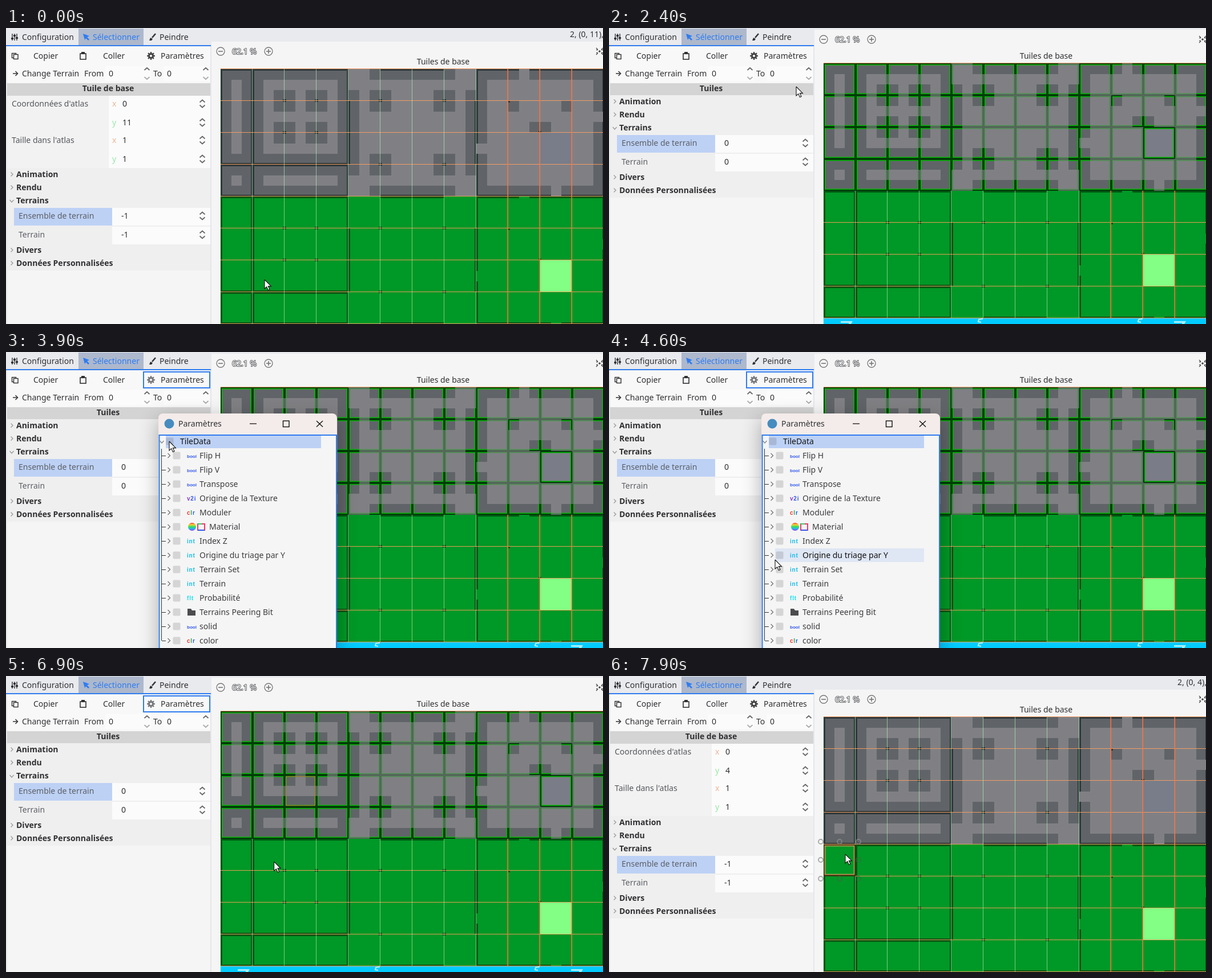
Recreate the animation shown at these times as an HTML page with a canvas. Size 1046 px wide and 520 px high, loop 8000 ms.

```html
<!DOCTYPE html>
<html lang="fr">
<head>
<meta charset="utf-8">
<style>
html, body { margin: 0; width: 100%; height: 100%; overflow: hidden; background: #f5f5f5; }
canvas { display: block; }
</style>
</head>
<body>
<canvas id="stage" width="1046" height="520"></canvas>
<script>
const ctx = document.getElementById('stage').getContext('2d');
const LOOP = 8000, STEP = 100, LEFT = 376, CELL = 56, UNIT = CELL / 3;
const INK = '#303033', BLUE = '#2f7cf0', PALE = '#bdd1f5', GREEN = '#009826';
const ORANGE = 'rgba(255,158,96,.9)', RED_ORANGE = '#ff7440';

// time, x, y of the pointer tip
const PATH = [
  [0, 453, 442], [900, 400, 92], [1600, 1012, 262], [2400, 328, 103], [2700, 300, 52],
  [2900, 300, 52], [3100, 321, 73], [3600, 286, 157], [3900, 286, 157], [4400, 290, 358],
  [4600, 291, 365], [4900, 299, 382], [5100, 299, 382], [5400, 299, 407], [5900, 297, 445],
  [6400, 548, 124], [6600, 548, 124], [7150, 410, 480], [7300, 430, 445], [7650, 414, 313], [8000, 414, 313]
];
const TIMES = { grouped: 1600, params: 2700, open: 2900, cleared: 3800, set: 4900, terrain: 5400, close: 6500, single: 7700 };

function pointer(t) {
  const i = Math.max(1, PATH.findIndex(p => p[0] > t));
  const [t0, x0, y0] = PATH[i - 1], [t1, x1, y1] = PATH[i];
  const k = Math.min(1, Math.max(0, (t - t0) / (t1 - t0))), e = k * k * (3 - 2 * k);
  return [x0 + (x1 - x0) * e, y0 + (y1 - y0) * e];
}

function rect(x, y, w, h, color) { ctx.fillStyle = color; ctx.fillRect(x, y, w, h); }

function frame(x, y, w, h, color, width = 1) {
  ctx.strokeStyle = color; ctx.lineWidth = width; ctx.strokeRect(x, y, w, h);
}

function line(points, color = INK, width = 1.5) {
  ctx.beginPath();
  for (let i = 0; i < points.length; i += 2) ctx.lineTo(points[i], points[i + 1]);
  ctx.strokeStyle = color; ctx.lineWidth = width; ctx.stroke();
}

function poly(points, color) {
  ctx.beginPath();
  for (let i = 0; i < points.length; i += 2) ctx.lineTo(points[i], points[i + 1]);
  ctx.closePath(); ctx.fillStyle = color; ctx.fill();
}

function ring(x, y, r, color, width = 1.2) {
  ctx.beginPath(); ctx.arc(x, y, r, 0, 7);
  ctx.strokeStyle = color; ctx.lineWidth = width; ctx.stroke();
}

function disc(x, y, r, color) {
  ctx.beginPath(); ctx.arc(x, y, r, 0, 7); ctx.fillStyle = color; ctx.fill();
}

function setFont(weight = '', size = 14) { ctx.font = `${weight} ${size}px "Noto Sans", sans-serif`; }

// text placed by the vertical middle of its row
function text(s, x, y, color = INK, weight = '', align = 'left') {
  setFont(weight); ctx.textAlign = align; ctx.fillStyle = color;
  ctx.fillText(s, x, y + 5);
}

function spinner(x, y, gap = 2.5, low = '#666') {
  line([x - 4.5, y - gap, x, y - gap - 4, x + 4.5, y - gap], '#666', 1.7);
  line([x - 4.5, y + gap, x, y + gap + 4, x + 4.5, y + gap], low, 1.7);
}

function gear(x, y, color) {
  ring(x, y, 3.6, color, 3);
  for (let i = 0; i < 8; i++) {
    const c = Math.cos(i * Math.PI / 4), s = Math.sin(i * Math.PI / 4);
    line([x + c * 4, y + s * 4, x + c * 7, y + s * 7], color, 2.4);
  }
}

// ---- left side ----

function tabs() {
  rect(0, 0, 360, 30, '#e9eaed');
  rect(127, 1, 114, 29, '#adb8cc');
  rect(0, 30, 359, 2, BLUE);
  [11, 15, 19].forEach((x, i) => {
    line([x, 10, x, 22], INK, 1.4);
    rect(x - 2, [17, 12, 16][i], 4, 3, INK);
  });
  text('Configuration', 28, 16);
  poly([135, 10, 146, 14, 142, 16, 146, 20, 144, 22, 140, 18, 138, 21], BLUE);
  text('Sélectionner', 152, 16, BLUE);
  line([262, 10, 256, 17], INK, 2.5);
  poly([251, 22, 253, 17, 257, 19, 255, 22], INK);
  text('Peindre', 269, 16);
}

function toolbar(focused) {
  rect(2, 33, 356, 63, '#f8f8f8');
  frame(10.5, 44.5, 7, 8, INK, 1.4); rect(13, 46, 9, 9, '#f8f8f8'); frame(13.5, 46.5, 7.5, 8, INK, 1.4);
  text('Copier', 48, 49);
  frame(130, 45, 10, 10, INK, 1.6); rect(132, 42, 6, 4, INK);
  text('Coller', 170, 49);
  gear(254, 49, focused ? '#77787c' : '#444');
  text('Paramètres', 271, 49);
  if (focused) frame(241, 35, 116, 28, BLUE, 2);
  line([12, 80, 20, 80], INK); line([16.5, 76, 20.5, 80, 16.5, 84], INK);
  text('Change Terrain', 28, 80);
  rect(174, 67, 80, 26, '#fbfbfb'); rect(276, 67, 80, 26, '#fbfbfb');
  text('From', 137, 80); text('0', 180, 80);
  text('To', 258, 80); text('0', 282, 80);
  spinner(247, 80, 6, '#aaa'); spinner(350, 80, 6, '#aaa');
}

function heading(label, y, open) {
  line(open ? [6.5, y - 1, 10, y + 3, 13.5, y - 1] : [8.5, y - 3.5, 12, y, 8.5, y + 3.5], '#999', 1.3);
  text(label, 18, y, INK, 'bold');
}

function field(label, y, value, active) {
  rect(14, y - 14, 172, 31, active ? PALE : '#efefef');
  rect(186, y - 14, 172, 31, '#fbfbfb');
  text(label, 22, y, '#5d5f66'); text(value, 202, y); spinner(344, y);
}

function inspector(grouped, atlasRow) {
  rect(2, 97, 356, 22, '#d4d4d4');
  text(grouped ? 'Tuiles' : 'Tuile de base', 179, 106, INK, 'bold', 'center');
  const dy = grouped ? -128 : 0;
  if (!grouped) {
    rect(2, 119, 178, 127, '#f2f2f2'); rect(180, 119, 178, 127, '#fbfbfb');
    text("Coordonnées d'atlas", 10, 133, '#55575c');
    text("Taille dans l'atlas", 10, 197, '#55575c');
    [['x', 133, '0'], ['y', 166, atlasRow], ['x', 197, '1'], ['y', 230, '1']].forEach(([axis, y, value]) => {
      text(axis, 186, y, axis === 'x' ? '#efb796' : '#98e8a8');
      text(value, 204, y); spinner(344, y);
    });
  }
  rect(2, 246 + dy, 356, 180, '#efefef');
  heading('Animation', 257 + dy); heading('Rendu', 280 + dy); heading('Terrains', 303 + dy, true);
  field('Ensemble de terrain', 330 + dy, grouped ? '0' : '-1', true);
  field('Terrain', 363 + dy, grouped ? '0' : '-1');
  heading('Divers', 390 + dy); heading('Données Personnalisées', 413 + dy);
}

// ---- tile atlas, laid out in thirds of a cell ----

const FLOORS = [[1, 1, 1, 7], [1, 10, 1, 1], [4, 1, 7, 7], [4, 10, 7, 1], [12, 0, 12, 12], [25, 1, 10, 10]];
const GAPS = [[28, 0, 1, 1], [24, 7, 1, 1], [35, 4, 1, 1], [31, 11, 1, 1]];
const STRIPS = [[14, 0, 8, 1], [14, 11, 8, 1], [12, 2, 1, 8], [23, 2, 1, 8], [27, 3, 1, 1], [32, 3, 1, 1], [29, 5, 2, 1]];
const BLOCKS = [[0, 0, 3, 9], [0, 9, 3, 3], [3, 0, 9, 9], [3, 9, 9, 3], [24, 0, 12, 12]];
const KNOTS = [[6, 3], [9, 3], [6, 6], [9, 6], [15, 3], [21, 3], [15, 9], [21, 9]];
const PILLARS = KNOTS.map(([x, y]) => [x - 1, y - 1, 2, 2]);

const px = (unit, from) => Math.round(from + unit * UNIT);

function addRects(list, top) {
  list.forEach(([x, y, w, h]) => {
    const a = px(x, LEFT), b = px(y, top);
    ctx.rect(a, b, px(x + w, LEFT) - a, px(y + h, top) - b);
  });
}

function fillRects(list, top, color, rule = 'nonzero') {
  ctx.beginPath(); addRects(list, top);
  ctx.fillStyle = color; ctx.fill(rule);
}

function tiles(top, floor, wall, edge) {
  rect(LEFT, top, 12 * CELL, 4 * CELL, wall);
  fillRects(FLOORS, top, floor);
  fillRects([...STRIPS, ...PILLARS], top, wall);
  BLOCKS.forEach(([x, y, w, h]) =>
    frame(px(x, LEFT) + 1.5, px(y, top) + 1.5, px(w, 0) - 3, px(h, 0) - 3, edge, 3));
  const side = 2 * CELL, x = LEFT + 5 * CELL, y = top + CELL;
  rect(x, top, side, 3, edge); rect(x, top + 4 * CELL - 3, side, 3, edge);
  rect(600, y, 3, side, edge); rect(821, y, 3, side, edge);
  fillRects(GAPS, top, floor);
  KNOTS.forEach(([u, v]) => rect(px(u, LEFT) - 3, px(v, top) - 3, 6, 5, edge));
  rect(880, top + CELL, 3, 3, edge); rect(933, top + 2 * CELL - 3, 5, 3, edge);
}

function gridLines(top) {
  for (let r = 0; r <= 8; r++) rect(LEFT, top - 1 + r * CELL, 670, 1, ORANGE);
  for (let c = 0; c < 12; c++) {
    const x = LEFT - 1 + c * CELL;
    if (c > 8) rect(x - .5, top, 1.5, 520 - top, RED_ORANGE);
    else rect(x, top, 1, 520 - top, 'rgba(190,255,195,.58)');
  }
}

function outlineTile(c, r, top) {
  const x = LEFT + c * CELL, y = top + r * CELL;
  frame(x + 1, y + 1, CELL - 2, CELL - 2, '#003d08', 2);
  frame(x + 2.75, y + 2.75, CELL - 5.5, CELL - 5.5, '#00b800', 1.5);
}

// every tile is outlined, then the floor colour veils the outlines
function groupOutline(top) {
  for (let c = 0; c < 12; c++) for (let r = 0; r < 4; r++) outlineTile(c, r, top);
  fillRects([...FLOORS, ...GAPS, ...STRIPS, ...PILLARS], top, 'rgba(128,128,132,.65)', 'evenodd');
  rect(936, top + 2 * CELL, CELL, CELL, '#7a7d87');
  outlineTile(10, 2, top);
}

function water(top) {
  rect(LEFT, top, 670, 12, '#00ccff');
  rect(LEFT, top - 1, 670, 1, ORANGE);
  [406, 990].forEach(x => poly([x, 515, x + 21, 515, x + 18, 520, x + 14, 520, x + 14, 518, x, 518], '#a9f0ff'));
  [646, 926].forEach(x => line([x + 9, 511, x + 2, 512, x + 1, 516, x + 6, 517], '#b8f2ff', 2));
}

function atlas(grouped, status) {
  const top = grouped ? 62 : 72, barY = grouped ? 20 : 41;
  rect(360, 0, 686, 520, '#f5f5f5');
  rect(360, 0, 686, grouped ? 3 : 24, '#e9eaed');
  if (!grouped) text(status, status.length > 10 ? 988 : 996, 11);
  [376, 460].forEach(x => {
    ring(x, barY, 7, '#777', 1.3);
    line([x - 4, barY, x + 4, barY], '#777', 1.6);
  });
  line([460, barY - 4, 460, barY + 4], '#777', 1.6);
  setFont(); ctx.textAlign = 'left'; ctx.lineJoin = 'round';
  ctx.strokeStyle = '#66676a'; ctx.lineWidth = 2; ctx.strokeText('62.1 %', 396, barY + 5);
  ctx.fillStyle = '#fff'; ctx.fillText('62.1 %', 396, barY + 5);
  ctx.lineJoin = 'miter';
  disc(1040, barY, 1.8, '#444');
  [[-1, -1], [1, -1], [-1, 1], [1, 1]].forEach(([sx, sy]) => {
    line([1040 + sx * 6, barY + sy * 6, 1040 + sx * 3, barY + sy * 3], '#444', 1.3);
    line([1040 + sx * 6, barY + sy * 2.5, 1040 + sx * 3, barY + sy * 2.5], '#444', 1.2);
  });
  text('Tuiles de base', 766, grouped ? 49 : 59, INK, '', 'center');

  tiles(top, '#808084', '#606468', '#30393a');
  rect(936, top + 2 * CELL, CELL, CELL, '#787d89');
  tiles(top + 4 * CELL, GREEN, GREEN, '#005512');
  rect(935, top + 6 * CELL, CELL, CELL, '#82ff84');
  gridLines(top);
  if (grouped) { groupOutline(top); water(top + 8 * CELL); }
}

function hoverTile(x, y) {
  const c = Math.floor((x - LEFT) / CELL), r = Math.floor((y - 62) / CELL);
  if (c < 0 || r < 0 || r > 7) return;
  ctx.setLineDash([2, 1]);
  frame(LEFT + c * CELL + 2.5, 62 + r * CELL + 2.5, 51, 51, '#cf7636', 1.6);
  ctx.setLineDash([]);
}

function selectedTile() {
  frame(377.5, 297.5, 53, 53, '#3a3a10', 3);
  frame(378.5, 298.5, 51, 50, '#c89a58', 1.5);
  [371, 404, 437].forEach((x, i) => [291, 323, 356].forEach((y, j) => {
    if (i !== 1 || j !== 1) ring(x, y, 4, x > 380 && y > 296 ? 'rgba(70,100,70,.55)' : 'rgba(140,140,140,.75)', 1.8);
  }));
}

// ---- settings window ----

const ROWS = [
  ['', 'TileData'], ['bool', 'Flip H'], ['bool', 'Flip V'], ['bool', 'Transpose'], ['v2i', 'Origine de la Texture'],
  ['clr', 'Moduler'], ['mat', 'Material'], ['int', 'Index Z'], ['int', 'Origine du triage par Y'], ['int', 'Terrain Set'],
  ['int', 'Terrain'], ['flt', 'Probabilité'], ['dir', 'Terrains Peering Bit'], ['bool', 'solid'], ['clr', 'color']
];
const TINTS = {
  bool: ['#3157ec'], int: ['#18bce8'], flt: ['#18dff0'],
  v2i: ['#8a3ad0', '#3157ec', '#3157ec'], clr: ['#f03030', '#18b040', '#3157ec']
};

function typeIcon(kind, y) {
  if (kind === 'dir') {
    poly([318, y - 6, 324, y - 6, 326, y - 3, 332, y - 3, 332, y + 6, 318, y + 6], '#4c4c4e');
  } else if (kind === 'mat') {
    const g = ctx.createLinearGradient(0, y - 7, 0, y + 7);
    ['#f04040', '#f0d030', '#30e060', '#30b0f0', '#9040f0'].forEach((c, i) => g.addColorStop(i / 4, c));
    disc(326, y, 7, g);
    frame(336, y - 5, 12, 11, '#ff3068', 2);
    line([336, y + 6, 348, y + 6], '#3157ec', 2); line([336, y - 5, 343, y - 5], '#28d060', 2);
  } else if (kind) {
    ctx.font = `bold ${kind === 'bool' ? 8 : 10}px "Liberation Sans", sans-serif`;
    ctx.textAlign = 'left';
    let x = 317;
    [...kind].forEach((ch, i) => {
      ctx.fillStyle = TINTS[kind][i % TINTS[kind].length];
      ctx.fillText(ch, x, y + 4);
      x += ctx.measureText(ch).width + (kind === 'bool' ? 0 : .8);
    });
  }
}

function checkbox(x, y, state) {
  ctx.beginPath(); ctx.roundRect(x - 6.5, y - 6.5, 13, 13, 2);
  ctx.fillStyle = state ? BLUE : 'rgba(60,60,60,.17)'; ctx.fill();
  if (state === 'on') line([x - 4, y, x - 1, y + 3, x + 4, y - 3], '#fff', 2);
  if (state === 'mixed') rect(x - 4, y - 1, 8, 2, '#fff');
}

function checkState(i, t) {
  if (t < TIMES.cleared) return 'on';
  if (i === 0) return t >= TIMES.set ? 'mixed' : '';
  return (i === 9 && t >= TIMES.set) || (i === 10 && t >= TIMES.terrain) ? 'on' : '';
}

function settings(t, amount) {
  ctx.save();
  const scale = .96 + .04 * amount;
  ctx.globalAlpha = Math.min(1, amount * 1.5);
  ctx.translate(400, 380); ctx.scale(scale, scale); ctx.translate(-400, -380);
  ctx.save();
  ctx.shadowColor = 'rgba(0,0,0,.3)'; ctx.shadowBlur = 34; ctx.shadowOffsetY = 10;
  ctx.beginPath(); ctx.roundRect(267, 108, 313, 440, 8); ctx.fillStyle = '#f4ecea'; ctx.fill();
  ctx.restore();
  rect(268, 146, 311, 400, '#f5f5f5');
  disc(286, 126, 8.5, '#478cbf');
  text('Paramètres', 302, 126);
  line([427, 126, 439, 126], '#111', 1.3);
  frame(485.5, 121, 10.5, 10.5, '#111', 1.4);
  line([544, 121, 555, 131.5], '#111', 1.4); line([555, 121, 544, 131.5], '#111', 1.4);

  const selected = t < TIMES.cleared ? -1 : t < TIMES.set ? 0 : t < TIMES.terrain ? 9 : 10;
  const [mx, my] = pointer(t - STEP);
  const hovered = mx > 268 && mx < 552 && my > 147 ? Math.round((my - 157) / 25) : -1;
  const mark = (i, color) => rect(i ? 291 : 280, 145 + i * 25, i ? 261 : 272, 24, color);
  if (hovered >= 0 && hovered !== selected) mark(hovered, '#dfe6f4');
  if (selected >= 0) mark(selected, PALE);

  const strong = selected === 0 ? 14 : selected;
  rect(272, 170, 1, 337, '#999');
  if (strong > 0) rect(272, 170, selected ? 2 : 1, strong * 25 - 13, '#333');
  ROWS.forEach(([kind, label], i) => {
    const y = 157 + i * 25;
    if (i) {
      rect(273, y, 7, 1, selected === 0 || i === selected ? '#333' : '#999');
      line([283.5, y - 4, 287.5, y, 283.5, y + 4], '#777', 1.4);
    } else line([269.5, y - 1, 273, y + 3, 276.5, y - 1], '#888', 1.4);
    checkbox(i ? 299 : 287, y, checkState(i, t));
    typeIcon(kind, y);
    text(label, i ? (kind === 'mat' ? 356 : 339) : 305, y, i === hovered || i === selected ? '#111' : '#3c3c3f');
  });
  if (selected >= 0) frame(268.5, 146, 310.5, 400, BLUE, 2);
  ctx.restore();
}

function cursor(x, y) {
  ctx.save(); ctx.translate(x, y);
  const shape = [0, 0, 0, 16, 3.8, 12.6, 6.4, 18.6, 9, 17.5, 6.4, 11.6, 11.4, 11.6];
  poly(shape, '#fff');
  line([...shape, 0, 0], '#111', 1.1);
  ctx.restore();
}

function draw(t) {
  const grouped = t >= TIMES.grouped && t < TIMES.single;
  const picked = t >= TIMES.single;
  rect(0, 0, 1046, 520, '#e6e7ea');
  rect(2, 32, 356, 488, '#f5f5f5');
  tabs();
  toolbar(t >= TIMES.params && !picked);
  inspector(grouped, picked ? '4' : '11');
  atlas(grouped, picked ? '2, (0, 4),' : '2, (0, 11),');
  if (picked) selectedTile();
  if (grouped && t > 6800) hoverTile(...pointer(t - 150));
  const amount = Math.min(1, (t - TIMES.open) / 250, (TIMES.close + 250 - t) / 250);
  if (amount > 0) settings(t, amount);
  cursor(...pointer(t));
}

function tick(now) {
  draw(Math.floor((now % LOOP) / STEP) * STEP);
  requestAnimationFrame(tick);
}
draw(0);
requestAnimationFrame(tick);
</script>
</body>
</html>
```
